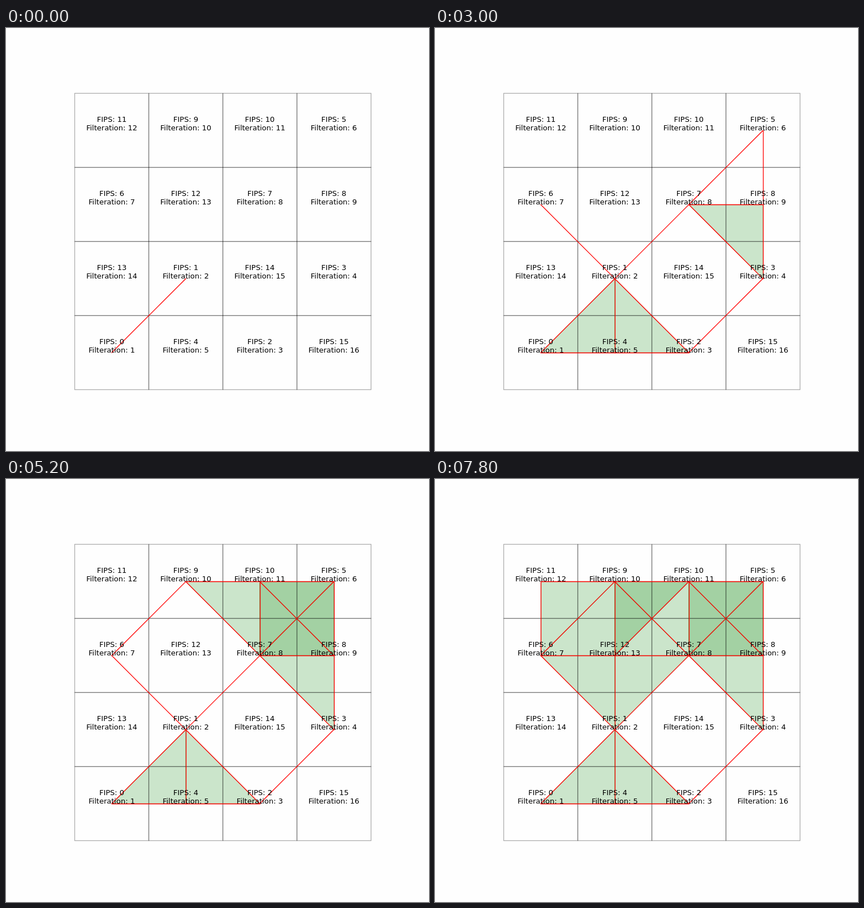
An HTML page that plays this animation: 748x748 px, repeating every 8000 ms.

```html
<!DOCTYPE html>
<html lang="en">
<head>
<meta charset="utf-8">
<title>Simplicial filtration</title>
<style>
  html, body { margin: 0; width: 100%; height: 100%; overflow: hidden; background: #fefefe; }
  svg { display: block; width: 748px; height: 748px; }
  path, rect { stroke-width: 1.3; }
  .grid rect { fill: none; stroke: #000; stroke-opacity: .32; }
  .fills path { fill: green; fill-opacity: .2; stroke: green; stroke-opacity: .2; }
  .edges path { fill: none; stroke: red; stroke-linecap: square; }
  text { font: 13px "DejaVu Sans", sans-serif; text-anchor: middle; fill: #000; }
</style>
</head>
<body>
<svg viewBox="0 0 748 748">
  <g class="fills"></g>
  <g class="grid"></g>
  <g class="edges"></g>
  <g class="labels"></g>
</svg>
<script>
const STEP = 200, STEPS = 40;
const PITCH = 130.9, BOX = 131;
const layout = [
  [11, 9, 10, 5],
  [6, 12, 7, 8],
  [13, 1, 14, 3],
  [0, 4, 2, 15]
];

function add(layer, tag, attrs, text = '') {
  const el = document.createElementNS('http://www.w3.org/2000/svg', tag);
  for (const key in attrs) el.setAttribute(key, attrs[key]);
  el.textContent = text;
  document.querySelector('.' + layer).append(el);
  return el;
}

const cells = [];
layout.forEach((ids, row) => ids.forEach((id, col) => {
  const x = 187 + col * PITCH, y = 181.4 + row * PITCH;
  const baseline = Math.round(y);
  cells[id] = { col, row, x, y };
  add('grid', 'rect', { x: 121.5 + col * BOX, y: 115.5 + row * BOX, width: BOX, height: BOX });
  add('labels', 'text', { x, y: baseline - 15 }, `FIPS: ${id}`);
  add('labels', 'text', { x, y: baseline }, `Filteration: ${id + 1}`);
}));

// Cells touching by a side or a corner are neighbours.
const touching = (a, b) =>
  Math.max(Math.abs(cells[a].col - cells[b].col), Math.abs(cells[a].row - cells[b].row)) === 1;

const lowerNeighbours = id => [...Array(id).keys()].filter(other => touching(id, other));

// Each vertex brings its edges, and each edge the triangles it closes.
const simplices = [];
cells.forEach((_, u) => {
  const near = lowerNeighbours(u);
  for (const v of near) {
    simplices.push([u, v]);
    lowerNeighbours(v)
      .filter(w => near.includes(w))
      .sort((a, b) => a % 8 - b % 8)
      .forEach(w => simplices.push([u, v, w]));
  }
});

// Upright and level edges sit on pixel centres; all else keeps exact coordinates.
const snap = v => Math.round(v) + .5;
const exact = v => v;

function outline(ids, place) {
  return 'M' + ids.map(id => `${place(cells[id].x)} ${place(cells[id].y)}`).join('L');
}

function drawSimplex(ids) {
  if (ids.length === 3) return add('fills', 'path', { d: outline(ids, exact) + 'Z' });
  const [a, b] = ids.map(id => cells[id]);
  const straight = a.col === b.col || a.row === b.row;
  return add('edges', 'path', { d: outline(ids, straight ? snap : exact) });
}

const shapes = simplices.slice(0, STEPS).map(drawSimplex);

function draw(now) {
  const step = Math.floor(now / STEP) % STEPS;
  shapes.forEach((shape, i) => { shape.style.visibility = i <= step ? 'visible' : 'hidden'; });
}

const start = performance.now();
function tick() {
  draw(performance.now() - start);
  requestAnimationFrame(tick);
}
tick();
</script>
</body>
</html>
```
